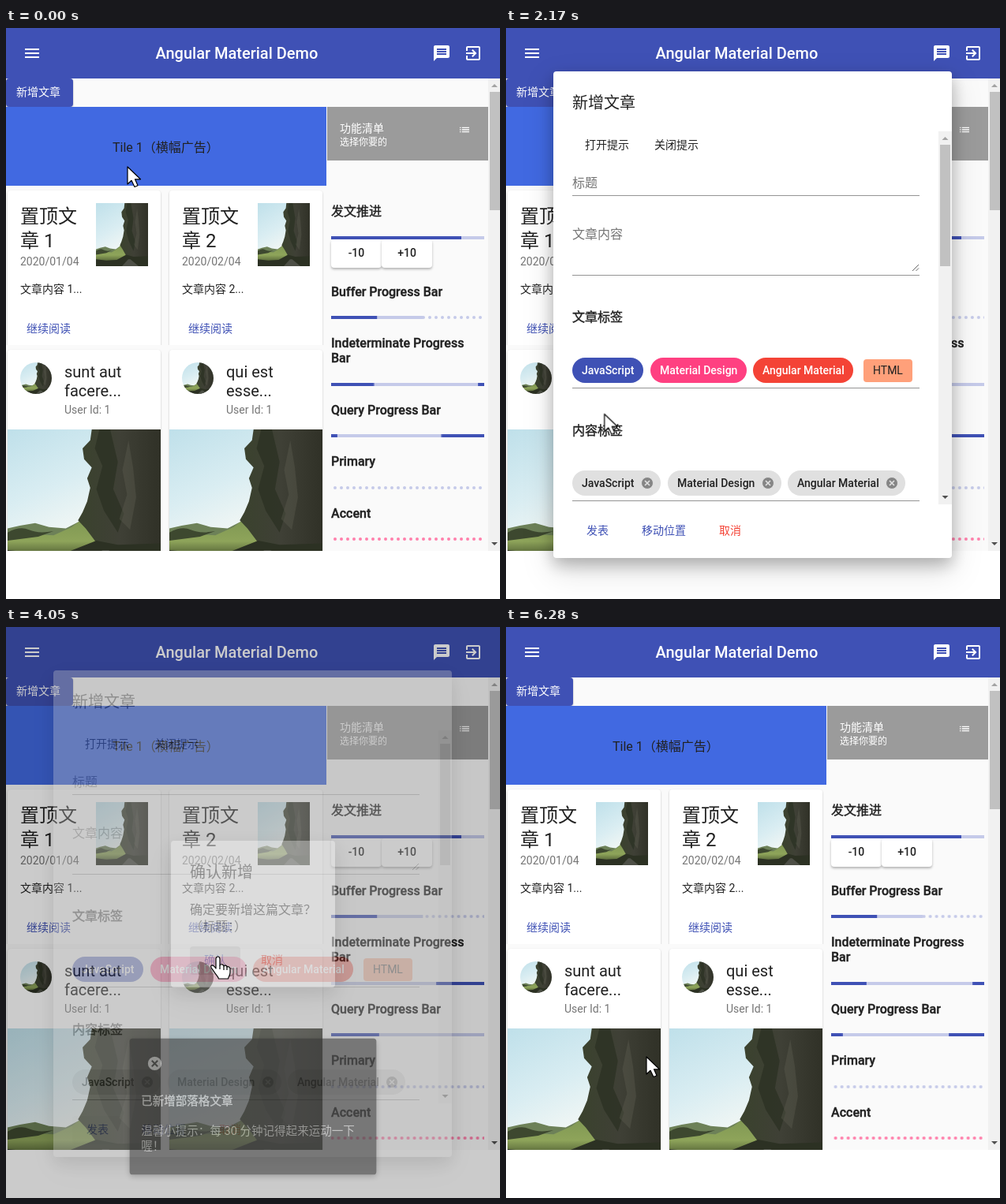
These frames come from a looping animation (626x724 px, 6.3 s). An HTML page:

```html
<!DOCTYPE html>
<html lang="zh-CN">
<head>
<meta charset="utf-8">
<title>Angular Material Demo</title>
<style>
html, body { margin: 0; width: 100%; height: 100%; overflow: hidden; background: #fff; }
body > svg { display: block; }
svg { --primary: #3f51b5; --track: #c5cae9; --warn: #f44336; }
text { font: 14px Roboto, "Noto Sans CJK SC", "Noto Sans CJK", sans-serif; fill: #212121; white-space: pre; }
.m { font-weight: 500; }
.s12 { font-size: 12px; }
.s16 { font-size: 16px; }
.s20 { font-size: 20px; }
.s24 { font-size: 24px; }
.h { font-size: 16px; font-weight: 500; stroke: #212121; stroke-width: .4px; }
.mid { text-anchor: middle; }
.grey { fill: #757575; }
.white { fill: #fff; }
.blue { fill: var(--primary); }
.red { fill: var(--warn); }
.track { fill: var(--track); }
.soft { fill: #fff; fill-opacity: .7; }
.bold { stroke: #fff; stroke-opacity: .7; stroke-width: .4px; }
.card { fill: #fff; filter: drop-shadow(0 1px 1px rgba(0,0,0,.22)); }
.raised { fill: #fff; filter: drop-shadow(0 2px 1.5px rgba(0,0,0,.28)); }
.sheet { fill: #fff; filter: drop-shadow(0 8px 10px rgba(0,0,0,.24)) drop-shadow(0 14px 18px rgba(0,0,0,.14)); }
.snackbox { fill: #323232; filter: drop-shadow(0 3px 4px rgba(0,0,0,.35)); }
.line { fill: #949494; }
.chip { fill: #e0e0e0; }

/* Endless progress bars */
.dots { animation: dots 262.5ms linear -164ms infinite; }
@keyframes dots { to { transform: translateX(-8px); } }
.move1, .size1, .move2, .size2 { animation: 2100ms linear -1302ms infinite; }
.size1, .size2 { transform-box: fill-box; transform-origin: center; }
.move1 { animation-name: move1; }
.size1 { animation-name: size1; }
.move2 { animation-name: move2; }
.size2 { animation-name: size2; }
@keyframes move1 {
  0% { transform: translateX(0); }
  20% { transform: translateX(0); animation-timing-function: cubic-bezier(.5,0,.702,.496); }
  59.15% { transform: translateX(162.32px); animation-timing-function: cubic-bezier(.302,.381,.55,.956); }
  100% { transform: translateX(389.19px); }
}
@keyframes size1 {
  0% { transform: scaleX(.08); }
  36.65% { transform: scaleX(.08); animation-timing-function: cubic-bezier(.335,.125,.786,1); }
  69.15% { transform: scaleX(.6615); animation-timing-function: cubic-bezier(.06,.11,.6,1); }
  100% { transform: scaleX(.08); }
}
@keyframes move2 {
  0% { transform: translateX(0); animation-timing-function: cubic-bezier(.15,0,.515,.41); }
  25% { transform: translateX(73.04px); animation-timing-function: cubic-bezier(.31,.284,.8,.734); }
  48.35% { transform: translateX(163.71px); animation-timing-function: cubic-bezier(.4,.627,.6,.902); }
  100% { transform: translateX(310.94px); }
}
@keyframes size2 {
  0% { transform: scaleX(.08); animation-timing-function: cubic-bezier(.205,.057,.577,.454); }
  19.15% { transform: scaleX(.4571); animation-timing-function: cubic-bezier(.152,.196,.648,1.004); }
  44.15% { transform: scaleX(.728); animation-timing-function: cubic-bezier(.258,-.003,.212,1.382); }
  100% { transform: scaleX(.08); }
}

/* Story: one 6300 ms loop */
.play { animation: 6300ms linear infinite; }
#editor { transform-origin: 312.5px 363.5px; animation-name: editor; }
#confirm { transform-origin: 313px 364px; animation-name: confirm; }
#snack { transform-origin: 313px 608px; animation-name: snack; }
#shade { animation-name: shade; }
#focus { animation-name: focus; }
#openRipple { transform-origin: 68px 82px; animation-name: openRipple; }
#sendRipple { transform-origin: 116px 636px; animation-name: sendRipple; }
#sendFocus { animation-name: sendFocus; }
#cursor { animation-name: cursor; }
#hand { animation-name: hand; animation-timing-function: step-end; }
#arrow { animation-name: arrow; animation-timing-function: step-end; }
@keyframes editor {
  0%, 21.97% { opacity: 0; transform: scale(.7); animation-timing-function: cubic-bezier(0,0,.2,1); }
  24.33% { opacity: 1; transform: none; }
  63.79% { opacity: 1; transform: none; animation-timing-function: cubic-bezier(.4,0,.2,1); }
  64.98%, 100% { opacity: 0; transform: none; }
}
@keyframes confirm {
  0%, 45.825% { opacity: 0; transform: scale(.7); animation-timing-function: cubic-bezier(0,0,.2,1); }
  48.206% { opacity: 1; transform: none; }
  63.79% { opacity: 1; transform: none; animation-timing-function: cubic-bezier(.4,0,.2,1); }
  64.98%, 100% { opacity: 0; transform: none; }
}
@keyframes snack {
  0%, 63.76% { opacity: 0; transform: scale(.8); animation-timing-function: cubic-bezier(0,0,.2,1); }
  66.14% { opacity: 1; transform: none; }
  87.3% { opacity: 1; transform: none; animation-timing-function: cubic-bezier(.4,0,1,1); }
  88.49%, 100% { opacity: 0; transform: none; }
}
@keyframes shade {
  0%, 45.714% { opacity: 0; animation-timing-function: cubic-bezier(.25,.8,.25,1); }
  52.06% { opacity: .32; }
  63.587% { opacity: .32; animation-timing-function: cubic-bezier(.25,.8,.25,1); }
  69.937%, 100% { opacity: 0; }
}
@keyframes focus {
  0%, 14.29% { opacity: 0; }
  15.87%, 20.63% { opacity: .06; }
  22.22%, 23.5% { opacity: .12; }
  25%, 64.4% { opacity: 0; }
  66.5%, 87.3% { opacity: .12; }
  89%, 100% { opacity: 0; }
}
@keyframes openRipple {
  0%, 20.63% { opacity: .1; transform: scale(0); animation-timing-function: cubic-bezier(0,0,.2,1); }
  24.21% { opacity: .1; transform: none; }
  28.57%, 100% { opacity: 0; transform: none; }
}
@keyframes sendRipple {
  0%, 45.24% { opacity: .1; transform: scale(0); animation-timing-function: cubic-bezier(0,0,.2,1); }
  48.81% { opacity: .1; transform: none; }
  55.16%, 100% { opacity: 0; transform: none; }
}
@keyframes sendFocus {
  0%, 38.1% { opacity: 0; }
  40%, 100% { opacity: .03; }
}
@keyframes cursor {
  0%, 2.38% { transform: translate(154px,176px); }
  10.32% { transform: translate(117px,128px); }
  15.56%, 22.22% { transform: translate(68px,82px); }
  23.33%, 25.71% { transform: translate(62px,78px); }
  31.27% { transform: translate(130px,400px); }
  39.68%, 53.97% { transform: translate(116px,636px); }
  61.59%, 64.92% { transform: translate(268px,418px); }
  73.02% { transform: translate(197px,522px); }
  81.75%, 100% { transform: translate(178px,545px); }
}
@keyframes hand {
  0%, 22.22%, 45.714%, 64.76%, 88.25%, 100% { opacity: 0; }
  14.29%, 38.1%, 60%, 79.37% { opacity: 1; }
}
@keyframes arrow {
  0%, 22.22%, 45.714%, 64.76%, 88.25%, 100% { opacity: 1; }
  14.29%, 38.1%, 60%, 79.37% { opacity: 0; }
}
</style>
</head>
<body>
<svg width="626" height="724" viewBox="0 0 626 724">
<defs>
  <linearGradient id="sky" x2=".5" y2="1">
    <stop stop-color="#bfe0ea"/><stop offset=".45" stop-color="#d9edf2"/><stop offset=".75" stop-color="#f0f6f4"/>
  </linearGradient>
  <linearGradient id="rock">
    <stop stop-color="#3a422d"/><stop offset=".5" stop-color="#3f4036"/><stop offset="1" stop-color="#303127"/>
  </linearGradient>
  <linearGradient id="field" x2="0" y2="1">
    <stop stop-color="#7f9653"/><stop offset=".6" stop-color="#8ea45a"/><stop offset="1" stop-color="#4c5a32"/>
  </linearGradient>
  <symbol id="photo" viewBox="0 0 100 100" preserveAspectRatio="none">
    <path fill="url(#sky)" d="M0 0H100V100H0Z"/>
    <path fill="#6d8158" d="M0 73L8 71L18 69L27 72L38 73L50 66V90H0Z"/>
    <path fill="url(#field)" d="M0 80L14 77L30 78L42 72L50 65L64 84L44 93L20 94L0 92Z"/>
    <path fill="#3d482f" d="M0 76Q8 71 14 74T30 75L20 79L0 82Z"/>
    <path fill="url(#rock)" d="M55 0L54 8L49 14L50 22L55 28L52 36L54 43L52 53L49 61L46 67L51 73L57 82L64 100H100V0Z"/>
    <path fill="#2a3022" opacity=".7" d="M60 0L57 14L62 27L58 44L63 60L72 76L76 62L69 44L72 24L67 0Z"/>
    <path fill="#66665a" opacity=".3" d="M79 8L75 30L78 48L73 66L80 74L84 50L82 28Z"/>
    <path fill="#2c3123" d="M0 89L20 91L40 90L58 82L72 85L100 84V100H0Z"/>
    <path fill="#5b5c55" opacity=".7" d="M62 89L66 89L82 100H50Z"/>
  </symbol>
  <pattern id="bluedots" width="8" height="4" patternUnits="userSpaceOnUse"><circle class="track" cx="2" cy="2" r="2"/></pattern>
  <pattern id="pinkdots" width="8" height="4" patternUnits="userSpaceOnUse"><circle fill="#ff80ab" cx="2" cy="2" r="2"/></pattern>
  <g id="cancel"><circle r="7.5"/><path d="M-3 -3L3 3M3 -3L-3 3" stroke-width="1.7"/></g>
  <path id="up" d="M-4 2L0 -2L4 2Z"/>
  <path id="down" d="M-4 -2L0 2L4 -2Z"/>
  <clipPath id="main"><path d="M0 64H626V663H0Z"/></clipPath>
  <clipPath id="topcards"><path d="M0 200H410V402H0Z"/></clipPath>
  <clipPath id="newbtn"><rect y="64" width="85" height="36" rx="4"/></clipPath>
  <clipPath id="sendbtn"><rect x="84" y="620" width="64" height="36" rx="4"/></clipPath>
  <clipPath id="avatar"><circle cx="38" cy="444" r="20"/></clipPath>
</defs>

<rect width="626" height="724" fill="#fff"/>
<rect y="64" width="626" height="599" fill="#fafafa"/>

<!-- Toolbar -->
<rect class="blue" width="626" height="64"/>
<text class="m s20 white mid" x="292.5" y="39">Angular Material Demo</text>
<g fill="#fff">
  <path transform="translate(21 20)" d="M3 18h18v-2H3v2zm0-5h18v-2H3v2zm0-7v2h18V6H3z"/>
  <path transform="translate(540 20)" d="M20 2H4c-1.1 0-1.99.9-1.99 2L2 22l4-4h14c1.1 0 2-.9 2-2V4c0-1.1-.9-2-2-2zm-2 12H6v-2h12v2zm0-3H6V9h12v2zm0-3H6V6h12v2z"/>
  <path transform="translate(580 20)" d="M10.09 15.59L11.5 17l5-5-5-5-1.41 1.41L12.67 11H3v2h9.67l-2.58 2.59zM19 3H5c-1.11 0-2 .9-2 2v4h2V5h14v14H5v-4H3v4c0 1.1.89 2 2 2h14c1.1 0 2-.9 2-2V5c0-1.1-.9-2-2-2z"/>
</g>

<g clip-path="url(#main)">
  <rect class="blue" y="64" width="85" height="36" rx="4" style="filter:drop-shadow(0 1px 1px rgba(0,0,0,.25))"/>
  <g clip-path="url(#newbtn)">
    <rect id="focus" class="play" y="64" width="85" height="36"/>
    <circle id="openRipple" class="play" cx="68" cy="82" r="72" fill="#fff"/>
  </g>
  <text class="m white" x="13" y="86">新增文章</text>
  <rect y="100" width="406" height="100" fill="#4169e1"/>
  <text class="s16" x="135" y="157">Tile 1（横幅广告）</text>

  <!-- Pinned articles -->
  <g clip-path="url(#topcards)">
    <rect class="card" x="2" y="206" width="194" height="210" rx="4"/>
    <rect class="card" x="207" y="206" width="194" height="210" rx="4"/>
  </g>
  <g>
    <text class="s24" x="18" y="247">置顶文<tspan x="18" y="278">章 1</tspan></text>
    <text class="grey" x="18" y="301">2020/01/04</text>
    <use href="#photo" x="114" y="222" width="66" height="80"/>
    <text x="18" y="336">文章内容 1...</text>
    <text class="blue" x="26" y="386">继续阅读</text>
  </g>
  <g transform="translate(205)">
    <text class="s24" x="18" y="247">置顶文<tspan x="18" y="278">章 2</tspan></text>
    <text class="grey" x="18" y="301">2020/02/04</text>
    <use href="#photo" x="114" y="222" width="66" height="80"/>
    <text x="18" y="336">文章内容 2...</text>
    <text class="blue" x="26" y="386">继续阅读</text>
  </g>

  <!-- Posts -->
  <g id="post">
    <rect class="card" x="2" y="408" width="194" height="270" rx="4"/>
    <g clip-path="url(#avatar)"><use href="#photo" x="18" y="424" width="40" height="40"/></g>
    <text class="grey" x="74" y="489">User Id: 1</text>
    <use href="#photo" x="2" y="509" width="194" height="172"/>
  </g>
  <use href="#post" x="205"/>
  <text class="s20" x="74" y="443">sunt aut<tspan x="74" y="467">facere...</tspan></text>
  <text class="s20" x="279" y="443">qui est<tspan x="279" y="467">esse...</tspan></text>

  <!-- Sidebar -->
  <rect x="407" y="100" width="204" height="68" fill="#9b9b9b"/>
  <text class="m white" x="423" y="132">功能清单</text>
  <text class="m white s12" x="423" y="149">选择你要的</text>
  <path fill="#fff" transform="translate(573 121) scale(.667)" d="M3 13h2v-2H3v2zm0 4h2v-2H3v2zm0-8h2V7H3v2zm4 4h14v-2H7v2zm0 4h14v-2H7v2zM7 7v2h14V7H7z"/>
  <text class="h" x="412" y="238">发文推进</text>
  <rect class="track" x="412" y="264" width="194" height="4"/>
  <rect class="blue" x="412" y="264" width="165" height="4"/>
  <rect class="raised" x="412" y="268" width="64" height="36" rx="4"/>
  <rect class="raised" x="476" y="268" width="64" height="36" rx="4"/>
  <text class="m mid" x="444" y="290">-10</text>
  <text class="m mid" x="508" y="290">+10</text>
  <text class="h" x="412" y="340">Buffer Progress Bar</text>
  <svg x="412" y="365" width="194" height="4">
    <rect class="dots" width="208" height="4" fill="url(#bluedots)"/>
    <rect class="track" width="116.4" height="4"/>
    <rect class="blue" width="58.2" height="4"/>
  </svg>
  <text class="h" x="412" y="405">Indeterminate Progress<tspan x="412" y="424">Bar</tspan></text>
  <svg x="412" y="450" width="194" height="4">
    <rect class="track" width="194" height="4"/>
    <g class="move1"><rect class="size1 blue" x="-281.62" width="194" height="4"/></g>
    <g class="move2"><rect class="size2 blue" x="-106.48" width="194" height="4"/></g>
  </svg>
  <text class="h" x="412" y="490">Query Progress Bar</text>
  <g transform="translate(1018) scale(-1 1)">
    <svg x="412" y="515" width="194" height="4">
      <rect class="track" width="194" height="4"/>
      <g class="move1"><rect class="size1 blue" x="-281.62" width="194" height="4"/></g>
      <g class="move2"><rect class="size2 blue" x="-106.48" width="194" height="4"/></g>
    </svg>
  </g>
  <text class="h" x="412" y="555">Primary</text>
  <svg x="412" y="581" width="194" height="4"><rect class="dots" width="208" height="4" fill="url(#bluedots)"/></svg>
  <text class="h" x="412" y="621">Accent</text>
  <svg x="412" y="646" width="194" height="4"><rect class="dots" width="208" height="4" fill="url(#pinkdots)"/></svg>

  <rect x="611" y="64" width="15" height="599" fill="#f1f1f1"/>
  <rect x="613" y="81" width="13" height="150" fill="#c1c1c1"/>
  <use href="#up" x="619" y="73" fill="#a3a3a3"/>
  <use href="#down" x="619" y="654" fill="#505050"/>
</g>

<!-- Article editor -->
<g id="editor" class="play">
  <rect class="sheet" x="60" y="55" width="505" height="617" rx="4"/>
  <text class="s20" x="84" y="102">新增文章</text>
  <text x="100" y="153">打开提示</text>
  <text x="188" y="153">关闭提示</text>
  <text class="s16 grey" x="84" y="202">标题</text>
  <text class="s16 grey" x="84" y="267">文章内容</text>
  <path d="M515 308L523 300M519.5 308L523 304.5" stroke="#666"/>
  <text class="h" x="84" y="372">文章标签</text>
  <text class="h" x="84" y="516">内容标签</text>
  <g class="line">
    <rect x="84" y="212" width="440" height="1"/>
    <rect x="84" y="313" width="440" height="1"/>
    <rect x="84" y="456" width="440" height="1"/>
    <rect x="84" y="599" width="440" height="1"/>
  </g>
  <rect class="blue" x="84" y="418" width="90" height="32" rx="16"/>
  <rect x="183" y="418" width="122" height="32" rx="16" fill="#ff4081"/>
  <rect class="red" x="313" y="418" width="127" height="32" rx="16"/>
  <rect x="453" y="420" width="62" height="29" rx="4" fill="#ffa07a"/>
  <text class="m white" x="96" y="439">JavaScript</text>
  <text class="m white" x="195" y="439">Material Design</text>
  <text class="m white" x="325" y="439">Angular Material</text>
  <text x="465" y="439">HTML</text>
  <rect class="chip" x="84" y="561" width="112" height="32" rx="16"/>
  <rect class="chip" x="205" y="561" width="144" height="32" rx="16"/>
  <rect class="chip" x="357" y="561" width="149" height="32" rx="16"/>
  <text class="m" x="96" y="582">JavaScript</text>
  <text class="m" x="217" y="582">Material Design</text>
  <text class="m" x="369" y="582">Angular Material</text>
  <g fill="#858585" stroke="#e0e0e0">
    <use href="#cancel" x="179" y="577"/>
    <use href="#cancel" x="332" y="577"/>
    <use href="#cancel" x="489" y="577"/>
  </g>
  <rect x="548" y="131" width="17" height="473" fill="#f1f1f1"/>
  <rect x="550" y="148" width="13" height="154" fill="#c1c1c1"/>
  <use href="#up" x="556.5" y="140" fill="#a3a3a3"/>
  <use href="#down" x="556.5" y="595" fill="#505050"/>
  <g clip-path="url(#sendbtn)">
    <rect id="sendFocus" class="play" x="84" y="620" width="64" height="36"/>
    <circle id="sendRipple" class="play blue" cx="116" cy="636" r="40"/>
  </g>
  <text class="blue" x="102" y="642">发表</text>
  <text class="blue" x="172" y="642">移动位置</text>
  <text class="red" x="270" y="642">取消</text>
</g>

<rect id="shade" class="play" width="626" height="724"/>

<!-- Confirmation -->
<g id="confirm" class="play">
  <rect class="sheet" x="209" y="271" width="208" height="186" rx="4"/>
  <text class="s20" x="233" y="318">确认新增</text>
  <text class="s16" x="233" y="364">确定要新增这篇文章？<tspan x="233" y="385">（标题：）</tspan></text>
  <rect x="233" y="405" width="64" height="36" rx="4" opacity=".12"/>
  <text class="blue" x="251" y="427">确认</text>
  <text class="red" x="323" y="427">取消</text>
</g>

<!-- Snackbar -->
<g id="snack" class="play">
  <rect class="snackbox" x="141" y="513" width="344" height="190" rx="4"/>
  <use href="#cancel" transform="translate(176 548) scale(1.36)" fill="#c1c1c1" stroke="#323232"/>
  <text class="s16 m soft bold" x="157" y="606">已新增部落格文章</text>
  <text class="s16 soft" x="157" y="648">温馨小提示：每 30 分钟记得起来运动一下<tspan x="157" y="668">喔！</tspan></text>
</g>

<g id="cursor" class="play" stroke="#000" stroke-width="1.2" stroke-linejoin="round" fill="#fff">
  <path id="arrow" class="play" d="M0 0V22L5 17.3L9 25.5L13 23.8L9.5 15.8H16.5Z"/>
  <g id="hand" class="play">
    <path d="M-2 3C-2 -1 3 -1 3 3V11C4 9 7.5 9.5 8 12C9 10.5 12 11 12 13C13.5 12 16 13 16 15.5V20C16 24 14 25 13.5 28H1.5C1 25 -3 22 -5 18C-7 15 -9.5 13 -8 11.5C-6.5 10 -4 12 -2 15Z"/>
    <path fill="none" d="M3 11V16M8 12V17M12 13V17"/>
  </g>
</g>
</svg>
</body>
</html>
```
